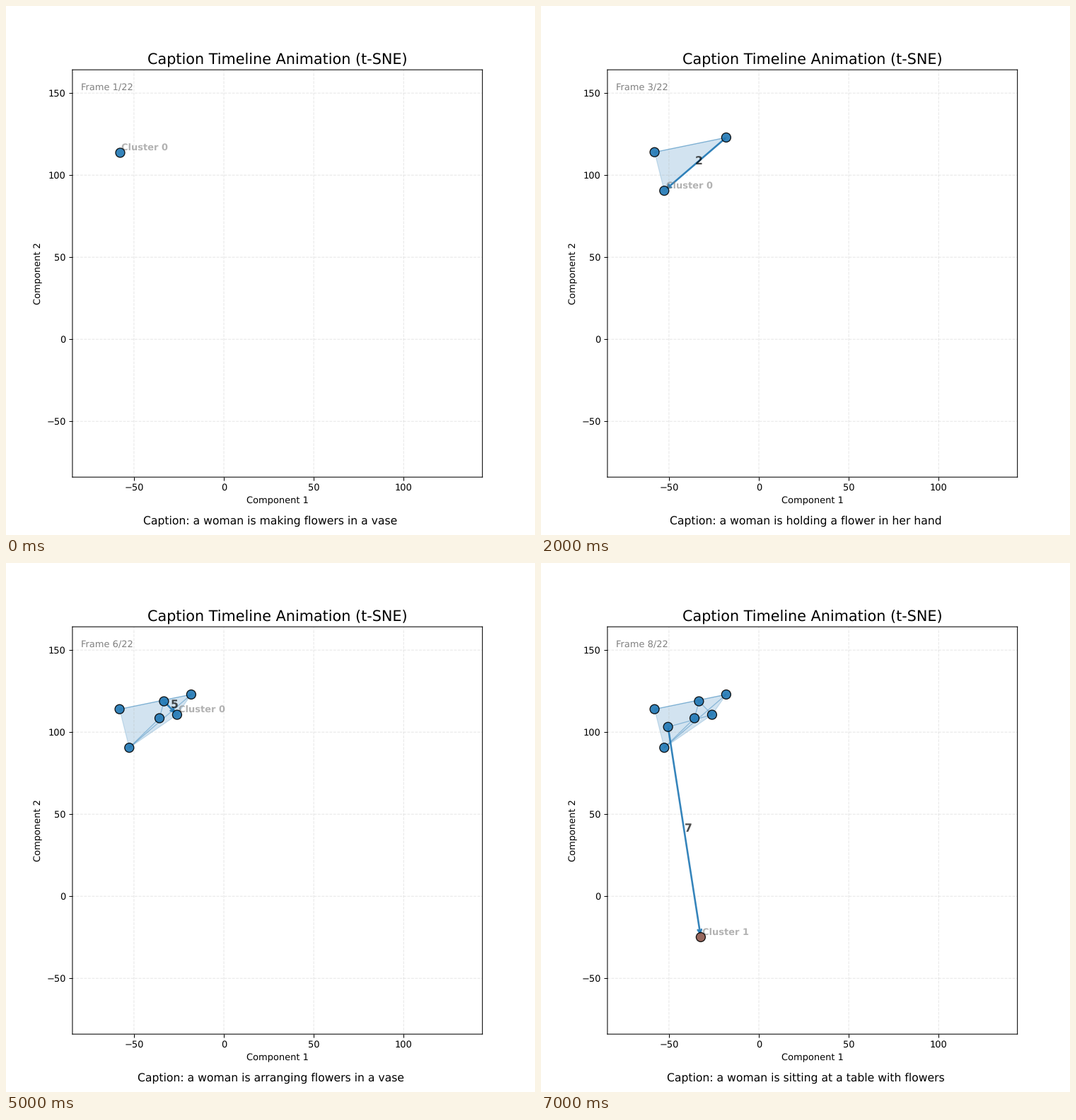
A matplotlib script that plays this animation: 748 by 748 pixels, repeating every 8 s.

```python
import matplotlib.pyplot as plt
from matplotlib.animation import FuncAnimation
from matplotlib.colors import to_rgba

# Smooth, unsnapped outlines and evenly spaced glyphs.
plt.rcParams.update({"font.family": "DejaVu Sans", "text.hinting": "none",
                     "path.snap": False})

POINTS = [(-58.0, 114.0), (-18.15, 122.95), (-52.6, 90.5), (-35.8, 108.5),
          (-33.3, 118.8), (-26.0, 110.6), (-50.5, 103.2), (-32.3, -24.9)]
CLUSTERS = [0, 0, 0, 0, 0, 0, 0, 1]
COLORS = ["#1f77b4", "#8c564b"]
CAPTIONS = [
    "a woman is making flowers in a vase",
    "a woman arranging flowers in a flower shop",
    "a woman is holding a flower in her hand",
    "a woman is arranging flowers in a vase",
    "a woman is arranging flowers in a vase",
    "a woman is arranging flowers in a vase",
    "a woman is making flowers in a vase",
    "a woman is sitting at a table with flowers",
]
TOTAL = 22

fig = plt.figure(figsize=(8, 8), dpi=93.5)
ax = fig.add_axes([0.1256, 0.1094, 0.775, 0.77])
caption = fig.text(0.5, 0.02, "", ha="center", fontsize=12)


def half_hull(pts):
    """One side of the convex hull of sorted points."""
    side = []
    for x, y in pts:
        while len(side) > 1:
            (ax0, ay0), (bx, by) = side[-2:]
            if (bx - ax0) * (y - ay0) - (by - ay0) * (x - ax0) > 0:
                break
            side.pop()
        side.append((x, y))
    return side[:-1]


def convex_hull(pts):
    pts = sorted(pts)
    return half_hull(pts) + half_hull(pts[::-1])


def draw_hulls(n):
    for cluster, color in enumerate(COLORS):
        members = [p for p, c in zip(POINTS[:n], CLUSTERS) if c == cluster]
        if len(members) > 2:
            ax.add_patch(plt.Polygon(convex_hull(members), color=color,
                                     alpha=0.2, lw=1, zorder=1))


def draw_steps(last):
    for k in range(1, last):
        (x0, y0), (x1, y1) = POINTS[k - 1], POINTS[k]
        ax.plot([x0, x1], [y0, y1], color=COLORS[CLUSTERS[k - 1]],
                lw=1, alpha=0.4, zorder=2)
    if last:
        start, end = POINTS[last - 1], POINTS[last]
        ax.annotate("", xy=end, xytext=start, zorder=3,
                    arrowprops=dict(arrowstyle="->", lw=2, alpha=0.9,
                                    color=COLORS[CLUSTERS[last - 1]]))
        ax.text((start[0] + end[0]) / 2, (start[1] + end[1]) / 2, str(last),
                fontsize=12, weight="bold", color="black", alpha=0.7, zorder=4)


def draw(i):
    ax.clear()
    ax.set_xlim(-84.2, 143.8)
    ax.set_ylim(-84, 164.2)
    ax.set_xticks(range(-50, 101, 50))
    ax.set_yticks(range(-50, 151, 50))
    ax.grid(True, linestyle="--", alpha=0.3)
    ax.set_title("Caption Timeline Animation (t-SNE)", fontsize=16)
    ax.set_xlabel("Component 1")
    ax.set_ylabel("Component 2")
    ax.text(0.02, 0.95, f"Frame {i + 1}/{TOTAL}", transform=ax.transAxes,
            fontsize=10, color="gray")

    draw_hulls(i + 1)
    draw_steps(i)

    x, y = POINTS[i]
    ax.text(x + 1, y + 1, f"Cluster {CLUSTERS[i]}", fontsize=10,
            weight="bold", color="gray", alpha=0.6, zorder=3)
    xs, ys = zip(*POINTS[:i + 1])
    ax.scatter(xs, ys, s=100, c=[to_rgba(COLORS[c]) for c in CLUSTERS[:i + 1]],
               edgecolors="black", linewidths=1, alpha=0.9, zorder=5)
    caption.set_text("Caption: " + CAPTIONS[i])
    return []


anim = FuncAnimation(fig, draw, frames=len(POINTS), interval=1000,
                     init_func=lambda: [], repeat=True, repeat_delay=0)
plt.show()
```
